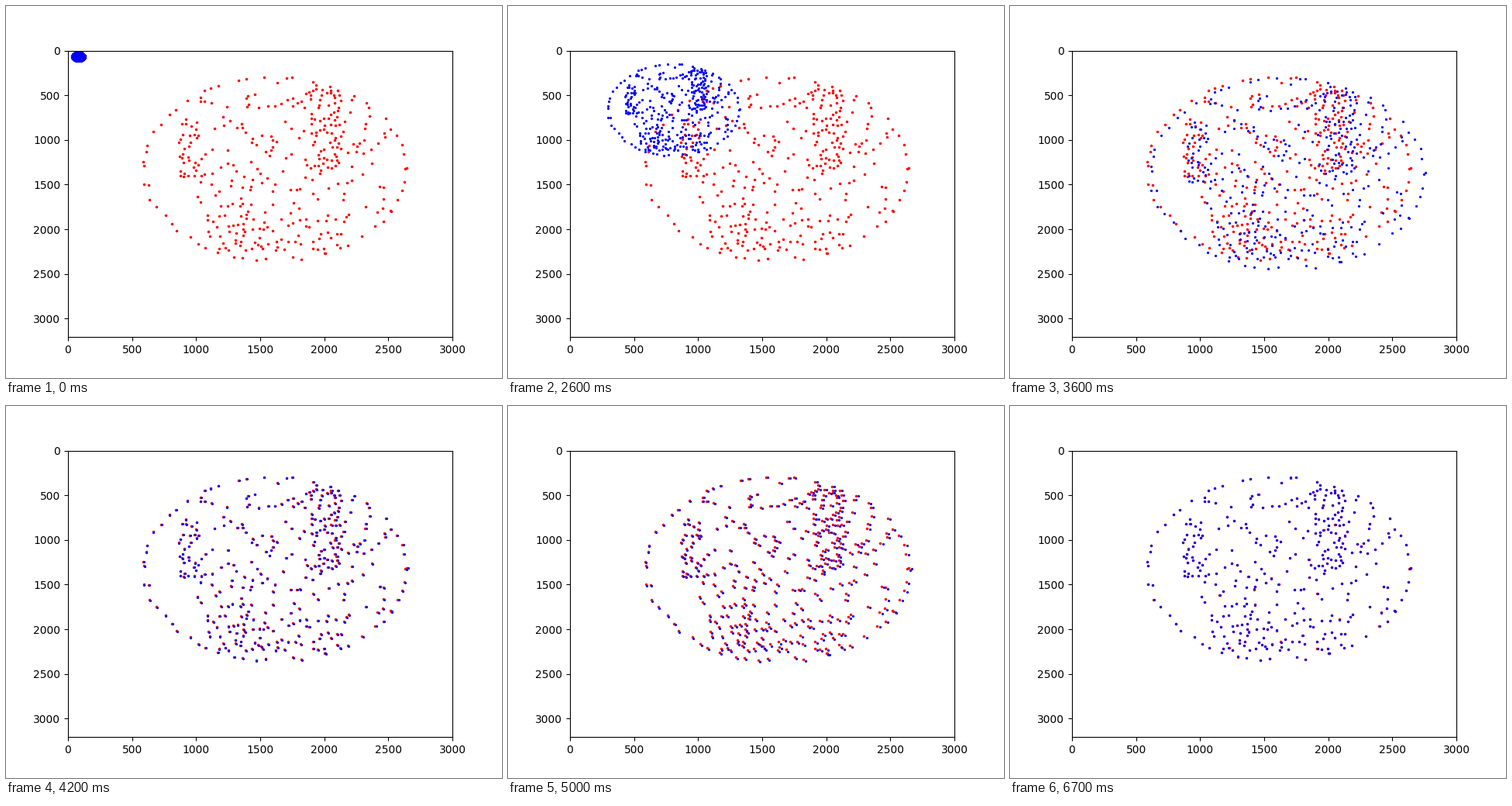
These frames come from a looping animation (640x480 px, 8900 ms). A matplotlib script:

```python
import numpy as np
import matplotlib.pyplot as plt
from matplotlib.animation import FuncAnimation

FRAMES, STEP = 89, 100
START, END = 20, 67          # frames between which the search runs
CENTER, RADIUS = np.array([1612, 1325]), 1035

rng = np.random.default_rng(12)


def rim(count):
    """Uneven ring of points just inside the circle."""
    angle = np.linspace(0, 2 * np.pi, count, endpoint=False)
    angle += rng.normal(0, 0.04, count)
    r = RADIUS - rng.exponential(14, count)
    return CENTER + np.column_stack([r * np.cos(angle), r * np.sin(angle)])


def fill(points, count, mid, half, gap=26):
    """Add spaced random points from a box, kept inside the circle."""
    goal = len(points) + count
    while len(points) < goal:
        p = np.array(mid) + rng.uniform(-1, 1, 2) * half
        inside = np.hypot(*(p - CENTER)) < RADIUS - 40
        if inside and np.hypot(*(points - p).T).min() > gap:
            points = np.vstack([points, p])
    return points


def scale(frame):
    """Model scale: a damped swing that settles on the best value."""
    if frame < START:
        return 1.0
    if frame >= END:
        return 20.0
    n = frame - START
    turns = 0.3177 * n - 0.964 * (1 - np.exp(-(n / 5.47) ** 2))
    return 20 * (1 + 2.3 * 0.83 ** n * np.sin(np.pi * turns))


cloud = rim(60)
cloud = fill(cloud, 62, (2010, 850), (120, 470))     # dense right column
cloud = fill(cloud, 32, (940, 1090), (80, 360))      # left column
cloud = fill(cloud, 78, (1640, 2035), (560, 205))    # lower band
cloud = fill(cloud, 145, (1740, 1140), (740, 680))   # loose middle

goal = np.rint(cloud)
model = cloud / 20

fig, ax = plt.subplots(figsize=(6.4, 4.8), dpi=100)
ax.set_xlim(0, 3000)
ax.set_ylim(3208, 0)
dots = dict(marker="o", linestyle="none")
ax.plot(*goal.T, color="red", markersize=1.5, **dots)
blue, = ax.plot(*model.T, color="blue", markersize=1.3, **dots)


def update(frame):
    blue.set_data(*(model * scale(frame)).T)
    return blue,


def reset():
    return update(0)


anim = FuncAnimation(fig, update, frames=FRAMES, init_func=reset,
                     interval=STEP, repeat=True, repeat_delay=0)
plt.show()
```
